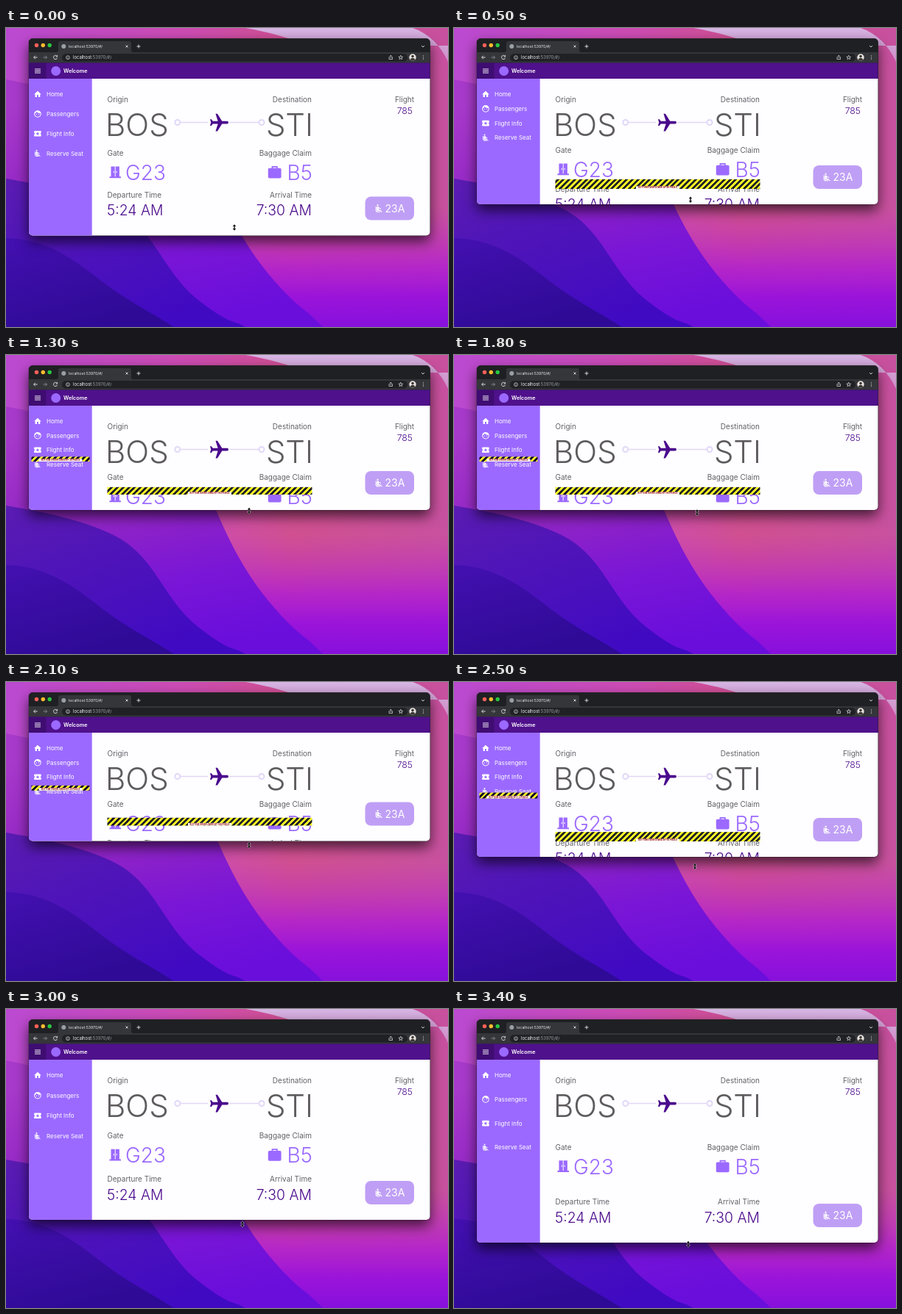
Write an HTML page that moves like this. It is 600 px wide and 407 px high and loops after 3500 ms.

```html
<!DOCTYPE html>
<html lang="en">
<head>
<meta charset="utf-8">
<title>Resizing a flight app</title>
<style>
html, body { margin: 0; width: 100%; height: 100%; overflow: hidden; background: #4a10b4 }
svg { display: block; width: 600px; height: 407px; font-family: Inter, "Open Sans", sans-serif; font-optical-sizing: none }
.label { font-size: 10px; fill: #626066 }
.city { font-size: 42px; font-weight: 350; fill: #5d5b5c }
.gate { font-size: 28px; font-weight: 330; fill: #9b69ff }
.time { font-size: 19.4px; fill: #4a0a8c; font-weight: 330 }
.nav { font-size: 8px; fill: #fff }
.warn { font-size: 2.85px; font-weight: 700; fill: #900000; text-anchor: middle }
.end { text-anchor: end }
.shadow { filter: drop-shadow(0 8px 9px #000a) }
.line { fill: none; stroke: #e4e5e8; stroke-width: .9 }
</style>
</head>
<body>
<svg viewBox="0 0 600 407">
  <defs>
    <linearGradient id="sky" x1="0" y1="0" x2="1" y2="0">
      <stop stop-color="#bb4ad2"/><stop offset=".4" stop-color="#cd4cb4"/>
      <stop offset=".65" stop-color="#d05090"/><stop offset="1" stop-color="#c8519f"/>
    </linearGradient>
    <linearGradient id="glow" x1="0" y1="0" x2="0" y2="1">
      <stop offset=".6" stop-color="#c030c0" stop-opacity="0"/><stop offset=".8" stop-color="#b01fd0" stop-opacity=".85"/>
      <stop offset=".9" stop-color="#9a14da"/><stop offset="1" stop-color="#8710dc"/>
    </linearGradient>
    <linearGradient id="mist" x1="0" y1="0" x2="0" y2="1">
      <stop stop-color="#d6b6e4"/><stop offset="1" stop-color="#d08cc8"/>
    </linearGradient>
    <linearGradient id="hill" gradientUnits="userSpaceOnUse" x1="150" y1="80" x2="210" y2="407">
      <stop stop-color="#a83acb"/><stop offset=".4" stop-color="#9226c4"/>
      <stop offset=".7" stop-color="#7a16d6"/><stop offset="1" stop-color="#6a0edc"/>
    </linearGradient>
    <linearGradient id="slope" x1="0" y1="0" x2=".6" y2="1">
      <stop stop-color="#5a1cb2"/><stop offset="1" stop-color="#400ac2"/>
    </linearGradient>
    <linearGradient id="dune" x1="0" y1="0" x2=".5" y2="1">
      <stop stop-color="#4310b0"/><stop offset="1" stop-color="#2e0a96"/>
    </linearGradient>
    <linearGradient id="tape" gradientUnits="userSpaceOnUse" x1="3.9" y1="0" x2="7.8" y2="3.9" spreadMethod="repeat">
      <stop offset=".25" stop-color="#000"/><stop offset=".25" stop-color="#ff0"/>
      <stop offset=".75" stop-color="#ff0"/><stop offset=".75" stop-color="#000"/>
    </linearGradient>
    <clipPath id="clip"><rect class="frame" x="31" y="14.5" width="544.5" rx="5"/></clipPath>
    <path id="home" d="M10 20v-6h4v6h5v-8h3L12 3 2 12h3v8z"/>
    <path id="face" fill-rule="evenodd" d="M9 11.75a1.25 1.25 0 1 0 0 2.5 1.25 1.25 0 0 0 0-2.5zm6 0a1.25 1.25 0 1 0 0 2.5 1.25 1.25 0 0 0 0-2.5zM12 2a10 10 0 1 0 0 20 10 10 0 0 0 0-20zm0 18a8 8 0 0 1-7.95-8.86 10 10 0 0 0 5.2-5.37A10 10 0 0 0 19.67 9.74 8 8 0 0 1 12 20z"/>
    <path id="ticket" fill-rule="evenodd" d="M22 10V6a2 2 0 0 0-2-2H4a2 2 0 0 0-2 2v4a2 2 0 0 1 0 4v4a2 2 0 0 0 2 2h16a2 2 0 0 0 2-2v-4a2 2 0 0 1 0-4zM12 7l1.4 3.4 3.6.3-2.7 2.4.8 3.6-3.1-1.9-3.1 1.9.8-3.6L7 10.7l3.6-.3z"/>
    <path id="seat" d="M7.6 5.4a2 2 0 1 1 2.8 0 2 2 0 0 1-2.8 0zM6 16V7H4v9a5 5 0 0 0 5 5h6v-2H9a3 3 0 0 1-3-3zm14 4.07L14.93 15H11.5v-3.68c1.4 1.15 3.6 2.16 5.5 2.16v-2.16c-1.66.02-3.61-.87-4.67-2.04l-1.4-1.55A2.3 2.3 0 0 0 9.25 7 2.25 2.25 0 0 0 7 9.25V15a3 3 0 0 0 3 3h5.07l3.5 3.5z"/>
    <path id="plane" d="M21 16v-2l-8-5V3.5a1.5 1.5 0 0 0-3 0V9l-8 5v2l8-2.5V19l-2 1.5V22l3.5-1 3.5 1v-1.5L13 19v-5.5z"/>
  </defs>

  <rect width="600" height="407" fill="url(#sky)"/>
  <rect width="600" height="407" fill="url(#glow)"/>
  <path d="M325 0C360 6 385 14 410 24H600V46C590 24 575 8 552 0z" fill="url(#mist)"/>
  <path d="M0 70C80 85 250 130 285 211C308 265 330 305 365 345S405 380 430 407H0z" fill="url(#hill)"/>
  <path d="M0 205C40 212 110 224 155 250C205 280 215 335 262 371S305 395 325 407H0z" fill="url(#slope)"/>
  <path d="M0 286C45 287 80 305 120 337S185 380 228 407H0z" fill="url(#dune)"/>

  <rect class="frame shadow" x="31" y="14.5" width="544.5" rx="5" fill="#222" stroke="#111" stroke-opacity=".5"/>
  <g clip-path="url(#clip)">
    <rect x="31" y="14" width="545" height="20" fill="#1f2023"/>
    <path d="M68 33q3 0 3-3v-9q0-3 3-3h93q3 0 3 3v9q0 3 3 3z" fill="#35363a"/>
    <rect x="31" y="33" width="545" height="14.5" fill="#35363a"/>
    <circle cx="41.5" cy="23.5" r="2.7" fill="#fe5f57"/>
    <circle cx="50.3" cy="23.5" r="2.7" fill="#febc2e"/>
    <circle cx="59.2" cy="23.5" r="2.7" fill="#28c840"/>
    <circle cx="78.3" cy="25" r="3" fill="#9aa0a6"/>
    <text x="85" y="27" font-size="5.2" fill="#e8eaed">localhost:53970/#/</text>
    <rect x="76" y="35" width="469" height="10.5" rx="5.2" fill="#202124"/>
    <text x="91" y="42.1" font-size="5.9" fill="#f1f3f4">localhost<tspan fill="#9aa0a6">:53970/#/</tspan></text>
    <path class="line" d="M162.500 23.500l3 3m0-3l-3 3M177.500 25h5m-2.500-2.500v5M564 24l2 2 2-2M42.700 40h-5m2.200-2.300l-2.300 2.300 2.300 2.300M69.300 38.500a2.600 2.600 0 1 0 .3 2.200M69.600 37v2h-2"/>
    <path class="line" d="M50.500 40h5m-2.200-2.300l2.300 2.300-2.300 2.300" style="stroke:#8a8b8f"/>
    <g class="line" style="stroke-width:.7">
      <circle cx="84" cy="40.200" r="2.400"/><path d="M84 40v1.500m0-2.800v.6"/>
      <path d="M520.800 39.500h-.8v3h4.500v-3h-.8m-1.400 1.600v-4m-1.300 1.300l1.300-1.300 1.300 1.300"/>
      <path d="M535.800 37.200l.8 2 2.100.1-1.700 1.300.6 2.100-1.800-1.200-1.800 1.200.6-2.100-1.700-1.300 2.100-.1z"/>
    </g>
    <circle cx="552" cy="40" r="4.700" fill="#e9e4df"/>
    <path d="M548.800 43.500q.4-2.700 3.200-2.700t3.200 2.700q-3.200 2.300-6.400 0z" fill="#3b3836"/>
    <circle cx="552" cy="38.600" r="1.800" fill="#3b3836"/>
    <g fill="#d5d6da"><circle cx="566.500" cy="37.800" r=".6"/><circle cx="566.500" cy="40" r=".6"/><circle cx="566.500" cy="42.200" r=".6"/></g>

    <rect x="31" y="69" width="545" height="340" fill="#fefdff"/>
    <rect x="31" y="69" width="85.700" height="340" fill="#9b69ff"/>
    <rect x="31" y="47.500" width="545" height="21.500" fill="#4f118c"/>
    <rect x="31" y="47.500" width="23.500" height="21.500" fill="#3f0d72"/>
    <path d="M39 56h8m-8 2.500h8m-8 2.500h8" stroke="#fff"/>
    <circle cx="67.700" cy="58.500" r="6.500" fill="#9b69ff"/>
    <text x="78" y="61.200" font-size="7.200" font-weight="600" fill="#fff">Welcome</text>
    <g id="menu"></g>

    <text class="label" x="137.500" y="100.500">Origin</text>
    <text class="label end" x="415" y="100.500">Destination</text>
    <text class="label end" x="554" y="100.500">Flight</text>
    <text x="552" y="116.800" class="end" font-size="12.300" font-weight="330" fill="#4a0a8c">785</text>
    <text class="city" x="135" y="147">BOS</text>
    <text class="city end" x="417" y="147">STI</text>
    <g fill="none" stroke="#e1d8f8" stroke-width="2">
      <circle cx="232.800" cy="128.500" r="3.500"/><circle cx="347" cy="128.500" r="3.500"/>
      <path d="M236.500 128.500h37.500m29 0h40.500" stroke-width="1.500"/>
    </g>
    <use href="#plane" fill="#4a0a8c" transform="translate(289.500 128.500) rotate(90) scale(1.25) translate(-11.500 -12)"/>

    <g id="gate">
      <text class="label" x="137.500" y="3.800">Gate</text>
      <text class="label end" x="415" y="3.800">Baggage Claim</text>
      <text class="gate" x="162" y="37">G23</text>
      <text class="gate end" x="416" y="37">B5</text>
      <path d="M142.500 18.500h5.200v14h-5.200zM148.700 18.500h5.200v14h-5.200zM140.500 32.300h15.500v2h-15.500z" fill="#9b69ff"/>
      <path d="M146.300 24.800v2.400m3.800-2.400v2.400" stroke="#fff"/>
      <rect x="355.800" y="20.800" width="17.800" height="13.800" rx="1.800" fill="#9b69ff"/>
      <path d="M361.500 21v-2.200h6.400v2.200" fill="none" stroke="#9b69ff" stroke-width="1.700"/>
    </g>
    <g id="times">
      <text class="label" x="137.500" y="3.500">Departure Time</text>
      <text class="label end" x="415" y="3.500">Arrival Time</text>
      <text class="time" x="137" y="28">5:24 AM</text>
      <text class="time end" x="415" y="28">7:30 AM</text>
    </g>
    <g id="button">
      <rect x="487.500" y="-53" width="66.500" height="32" rx="8" fill="#bf9ff5"/>
      <use href="#seat" fill="#fff" transform="translate(499.500 -43.500) scale(.56)"/>
      <text x="514.500" y="-32" font-size="14" fill="#fff">23A</text>
    </g>
    <g id="tapes"></g>
  </g>
  <path id="cursor" d="M0-4.200l2.200 2.700h-1.500v3h1.500l-2.200 2.700-2.200-2.700h1.500v-3h-1.500z" fill="#111" stroke="#fff" stroke-width=".7" paint-order="stroke"/>
</svg>
<script>
const LOOP = 3500, STEP = 100, SCALE = .39;
const GATE_LIMIT = 274.5, MENU_LIMIT = 239;
// time in steps, window bottom, speed per step, pointer x
const keys = [
  [0, 282.5, -10, 310], [5, 240, -6.4, 321], [13, 211, -.8, 330], [21, 216.5, 2.7, 330],
  [25, 238, 8.5, 327], [30, 287, 3, 321], [34, 318, 0, 318]
];
const $ = id => document.getElementById(id);
const move = (el, x, y) => el.setAttribute('transform', `translate(${x} ${y})`);

$('menu').innerHTML = [['home', 'Home'], ['face', 'Passengers'], ['ticket', 'Flight Info'], ['seat', 'Reserve Seat']]
  .map(([icon, name]) => `<g><use href="#${icon}" fill="#fff" transform="translate(37.200 -5.800) scale(.48)"/>
    <text class="nav" x="55" y="2.900">${name}</text></g>`).join('');

// Cubic Hermite position and speed
function drag(n) {
  const i = Math.min(keys.findLastIndex(k => k[0] <= n), keys.length - 2);
  const [t0, y0, v0, x0] = keys[i], [t1, y1, v1, x1] = keys[i + 1];
  const h = t1 - t0, u = (n - t0) / h, d = y1 - y0;
  const a = h * (v0 + v1) - 2 * d, b = 3 * d - h * (2 * v0 + v1);
  return {
    bottom: y0 + u * (h * v0 + u * (b + u * a)),
    speed: v0 + u * (2 * b + 3 * u * a) / h,
    x: x0 + u * (x1 - x0)
  };
}

function tape(x, width, top, bottom, excess) {
  if (excess <= 0) return '';
  const height = (bottom - top) * .1, mid = x + width / 2;
  const amount = excess > 10 ? excess.toFixed(0) : excess > 1 ? excess.toFixed(1) : excess.toPrecision(3);
  return `<rect x="${x}" y="${bottom - height}" width="${width}" height="${height}" fill="url(#tape)" opacity=".85"/>
    <rect x="${mid - 29.5}" y="${bottom - 3.6}" width="59" height="3.600" fill="#fff"/>
    <text class="warn" x="${mid}" y="${bottom - .8}">BOTTOM OVERFLOWED BY ${amount} PIXELS</text>`;
}

function draw(now) {
  const { bottom, speed, x } = drag(Math.floor(now % LOOP / STEP));
  document.querySelectorAll('.frame').forEach(r => r.setAttribute('height', bottom - 14.5));

  const roomy = Math.max(bottom, GATE_LIMIT);
  move($('gate'), 0, 170 + (roomy - 282.5) / 2);
  move($('times'), 0, roomy - 55.5);
  move($('button'), 0, bottom);

  const gap = 26.8 + (Math.max(bottom, MENU_LIMIT) - 282.5) / 6;
  [...$('menu').children].forEach((item, i) => move(item, 0, 90.2 + i * gap));

  $('tapes').innerHTML =
    tape(137.5, 278, 88, bottom - 21, (GATE_LIMIT - bottom) / SCALE) +
    tape(34.5, 79, 79, 158.5 + (bottom - 238) / 2, (MENU_LIMIT - bottom) / 2 / SCALE);
  move($('cursor'), x, bottom + 2 + 1.3 * speed);
}

const start = performance.now();
(function tick() {
  draw(performance.now() - start);
  requestAnimationFrame(tick);
})();
</script>
</body>
</html>
```
